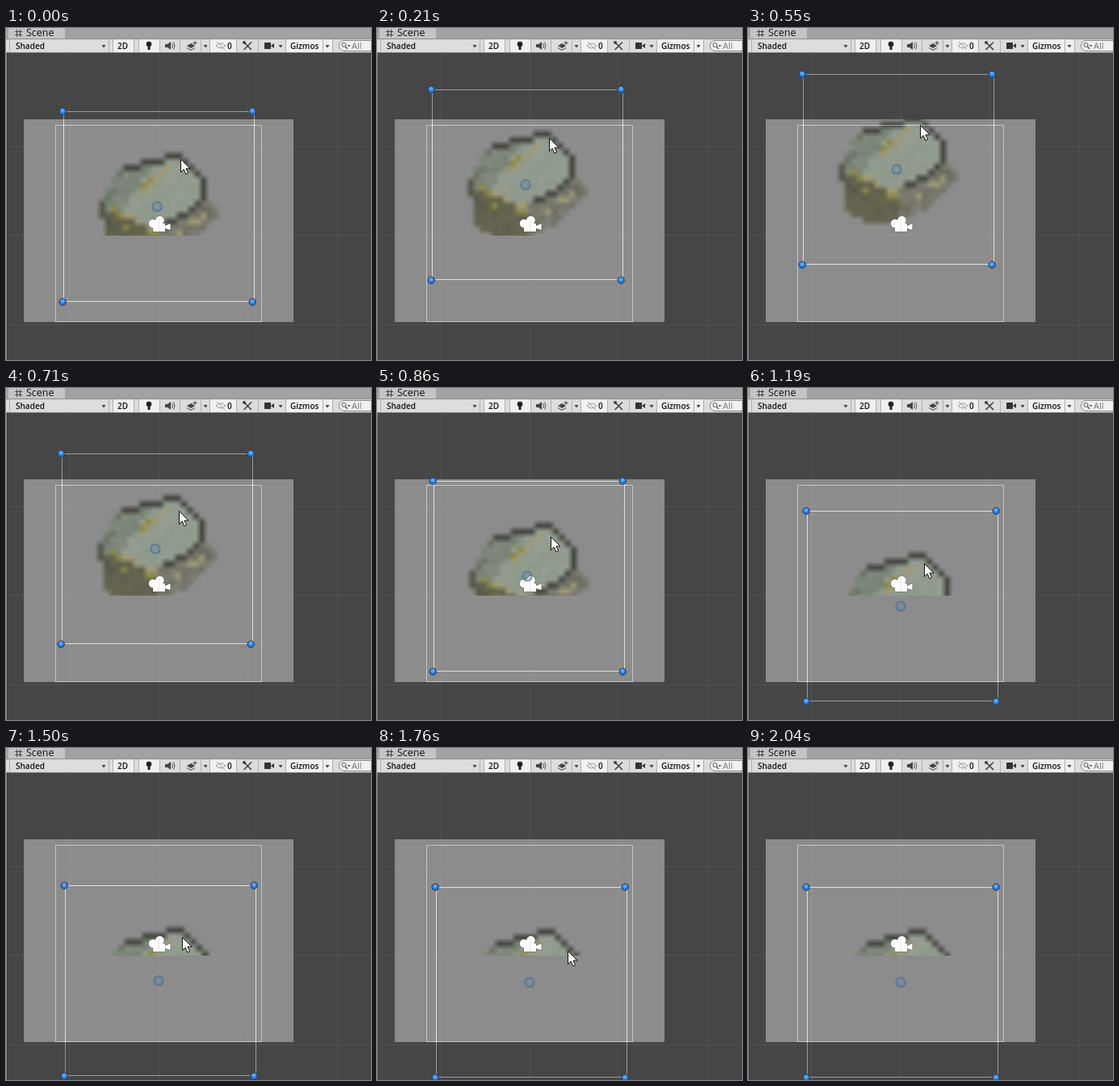
Animation, 452 px wide and 411 px high, one loop 2.31 s. Source, as an HTML page with a canvas:

```html
<!DOCTYPE html>
<html lang="en">
<head>
<meta charset="utf-8">
<title>Scene view</title>
<style>
html, body { margin: 0; width: 100%; height: 100%; overflow: hidden; background: #464646; }
canvas { display: block; }
</style>
</head>
<body>
<canvas id="stage" width="452" height="411"></canvas>
<script>
const W = 452, H = 411, LOOP = 2310, STEP = 30;
const SIZE = 236, CELLS = 32, FLOOR = 257;
const ctx = document.getElementById('stage').getContext('2d');

const lerp = (a, b, p) => a + (b - a) * p;
const span = (t, from, to) => Math.min(1, Math.max(0, (t - from) / (to - from)));
const smooth = p => p * p * (3 - 2 * p);

// Drag up, back down, then settle low
function selectionAt(t) {
  let x = 72, y;
  if (t < 570) {
    const p = 1 - (1 - span(t, 0, 540)) ** 1.8;
    x = Math.max(67, lerp(70, 65, p));
    y = lerp(103, 57, p);
  } else if (t < 1110) {
    const p = smooth(span(t, 570, 1080) ** .71);
    x = lerp(67, 70, p);
    y = lerp(57, 140, p);
  } else {
    y = lerp(140, 172, Math.sqrt(span(t, 1110, 1560)));
  }
  return [Math.round(x), Math.round(y)];
}

// The pointer runs one step ahead and finally leaves the stage
function pointerAt(t) {
  const [x, y] = selectionAt(t + STEP);
  const p = span(t, 1650, 2040) ** 1.7;
  return [x + 146 + Math.round(222 * p), y + 63 + Math.round(195 * p)];
}

function rect(x, y, w, h, fill, c = ctx) {
  c.fillStyle = fill;
  c.fillRect(x, y, w, h);
}

function paint(path, fill, stroke, width = 1) {
  if (fill) { ctx.fillStyle = fill; ctx.fill(path); }
  if (stroke) { ctx.strokeStyle = stroke; ctx.lineWidth = width; ctx.stroke(path); }
}

const shape = (d, ...style) => paint(new Path2D(d), ...style);

function dot(x, y, r, ...style) {
  const p = new Path2D();
  p.arc(x, y, r, 0, Math.PI * 2);
  paint(p, ...style);
}

function frame(x, y, w, h, color) {
  ctx.strokeStyle = color;
  ctx.lineWidth = 1;
  ctx.strokeRect(x + .5, y + .5, w, h);
}

function label(str, x, y, size = 10, weight = 600, color = '#111') {
  ctx.font = `${weight} ${size}px "Open Sans", sans-serif`;
  ctx.fillStyle = color;
  ctx.fillText(str, x, y);
}

// Low resolution boulder, one pixel per cell, enlarged with smoothing
function makeRock() {
  const sprite = document.createElement('canvas');
  sprite.width = sprite.height = CELLS;
  const c = sprite.getContext('2d');
  let seed = 11;
  const rand = () => (seed = seed * 16807 % 2147483647) / 2147483647;

  function face(d, light, vary) {
    const path = new Path2D(d);
    for (let y = 0; y < CELLS; y++) for (let x = 0; x < CELLS; x++) {
      if (!c.isPointInPath(path, x + .5, y + .5)) continue;
      const n = (rand() - .5) * vary;
      rect(x, y, 1, 1, `rgb(${light.map(v => v + n)})`, c);
    }
  }
  // Cells along a line, some left out by chance
  function streak(color, keep, ...points) {
    points.slice(1).forEach(([bx, by], i) => {
      const [ax, ay] = points[i];
      const n = Math.max(Math.abs(bx - ax), Math.abs(by - ay));
      for (let k = 0; k <= n; k++) {
        if (rand() < keep) rect(Math.round(lerp(ax, bx, k / n)), Math.round(lerp(ay, by, k / n)), 1, 1, color, c);
      }
    });
  }

  face('M6 15L8 16L16 19V25H12L9 24L7 22V18H6Z', [99, 98, 78], 8);
  face('M16 19L24 15L26 17L20 23L16 25Z', [117, 117, 106], 22);
  face('M10 10L12 9H18L11 17H7V14L8 12Z', [125, 135, 121], 14);
  face('M17 8H20L23 11V15L17 19H13L10 17L13 12Z', [145, 155, 142], 8);

  const dark = '#454741', tan = '#a19a76', moss = '#8b8948';
  streak('#687163', .6, [9, 10], [7, 14]);
  streak(dark, 1, [10, 9], [12, 9], [13, 8], [16, 8], [17, 7], [19, 7], [23, 11], [23, 14]);
  streak('#55574b', .9, [6, 15], [6, 17], [8, 19]);
  streak(tan, .7, [17, 9], [12, 14]);
  streak(moss, .5, [14, 11], [10, 15]);
  streak(tan, .8, [10, 17], [15, 19]);
  streak(moss, .6, [8, 16], [10, 19], [15, 20]);
  streak(dark, .9, [17, 19], [22, 15]);
  streak(dark, .7, [16, 18], [20, 17]);
  streak(tan, .4, [24, 16], [19, 20]);
  return sprite;
}
const rock = makeRock();

function drawToolbar() {
  rect(0, 0, W, 14, '#a2a2a2');
  rect(3, 0, 70, 14, '#c4c4c4');
  rect(0, 13, W, 1, '#8b8b8b');
  rect(0, 14, W, 16, '#dcdcdc');
  rect(0, 30, W, 1, '#7b7b7b');
  for (const [x, w] of [[133, 25], [165, 25], [253, 32], [347, 57]]) rect(x, 14, w, 16, '#f0f0f0');
  for (const x of [4, 127, 132, 158, 164, 190, 215, 241, 252, 285, 312, 346, 392, 404]) rect(x, 14, 1, 16, '#b0b0b0');

  shape('M13.5 2V11M17.5 2V11M11 4.5H20M11 8.5H20', null, '#444');
  label('Scene', 25, 10, 12.5, 400);
  label('Shaded', 12, 26);
  label('2D', 138, 26);
  label('0', 274, 26);
  label('Gizmos', 352, 26);
  for (const x of [121, 247, 340, 398]) shape(`M${x - 2.5} 21h5l-2.5 3.5z`, '#444');

  dot(177, 20, 3.3, '#222');
  rect(175.5, 23, 3, 4, '#222');
  shape('M197 20h3l4-3v10l-4-3h-3z', '#444');
  shape('M205.5 19q2 3 0 6M207.5 17.5q3 4.5 0 9', null, '#555');
  shape('M224 22l5-3 5 3-5 3z', '#444');
  shape('M224 24.5l5 3 5-3M234 16v5M231.5 18.5h5', null, '#444');
  shape('M260 22q6-6 12 0q-6 6-12 0zM261 17l10 10', null, '#999');
  shape('M294.5 17.5l9.5 9.5M304 17.500l-9.5 9.500', null, '#444', 1.6);
  dot(295, 18, 2, '#444');
  rect(320, 18, 8, 8, '#333');
  shape('M328 22l4-3v6z', '#333');

  const search = new Path2D();
  search.roundRect(412.5, 15.5, 60, 13, 6.5);
  paint(search, '#f0f0f0', '#888');
  dot(418.5, 21, 2.5, null, '#555');
  shape('M420.5 23l2.5 3', null, '#555', 1.3);
  shape('M422.5 21h4l-2 2.5z', '#666');
  label('All', 428, 26, 11, 400, '#777');
}

function drawScene() {
  rect(0, 0, W, H, '#464646');
  rect(22, 113, 334, 251, '#8c8c8c');
  const line = 'rgba(255,255,255,.06)';
  for (let i = 0; i < 4; i++) rect(Math.round(78 + i * 110.6), 31, 1, 380, line);
  for (let i = 0; i < 3; i++) rect(0, Math.round(146 + i * 110.4), W, 1, line);
  rect(0, 31, 1, 380, '#858585');
  rect(1, 31, 1, 380, '#393939');
}

function drawCamera() {
  const body = new Path2D('M182 242H197V245L203.500 242V250L197 248V252H182Z');
  for (const [x, y] of [[182, 242], [190.5, 238]]) {
    body.moveTo(x + 5.3, y);
    body.arc(x, y, 5.3, 0, Math.PI * 2);
  }
  paint(body, null, 'rgba(75,75,75,.5)', 1.6);
  paint(body, '#fff');
  rect(189, 234, 1, 18, 'rgba(120,120,120,.2)');
}

function drawSelection(x, y) {
  ctx.globalCompositeOperation = 'lighter';
  frame(x + 1, y, SIZE, SIZE - 1, '#545454');
  ctx.globalCompositeOperation = 'source-over';
  for (const dx of [0, 235]) for (const dy of [0, SIZE]) {
    dot(x + dx + .2, y + dy + .2, 4.2, '#2478dc', '#263b5c');
    dot(x + dx, y + dy - .8, 2.4, '#5ba5f4');
  }
  dot(x + 117, y + 118, 5.7, 'rgba(110,140,170,.15)', 'rgba(60,108,160,.75)', 1.7);
  dot(x + 117, y + 118, 3, null, 'rgba(70,115,165,.45)');
}

function drawPointer(x, y) {
  ctx.save();
  ctx.translate(x + .5, y + .5);
  shape('M0 0V16L3.7 12.5L6.3 18.5L9 17.3L6.4 11.5H11.5Z', '#fff', '#111');
  ctx.restore();
}

function draw(time) {
  const t = Math.floor(time % LOOP / STEP) * STEP;
  const [x, y] = selectionAt(t);
  drawScene();

  ctx.save();
  ctx.beginPath();
  ctx.rect(0, 31, W, FLOOR - 31);
  ctx.clip();
  ctx.drawImage(rock, x + 1, y, SIZE, SIZE);
  ctx.restore();

  frame(61, 120, 255, 243, 'rgba(255,255,255,.5)');
  drawCamera();
  drawSelection(x, y);
  drawToolbar();
  drawPointer(...pointerAt(t));
}

const start = performance.now();
function tick() {
  draw(performance.now() - start);
  requestAnimationFrame(tick);
}
tick();
</script>
</body>
</html>
```
